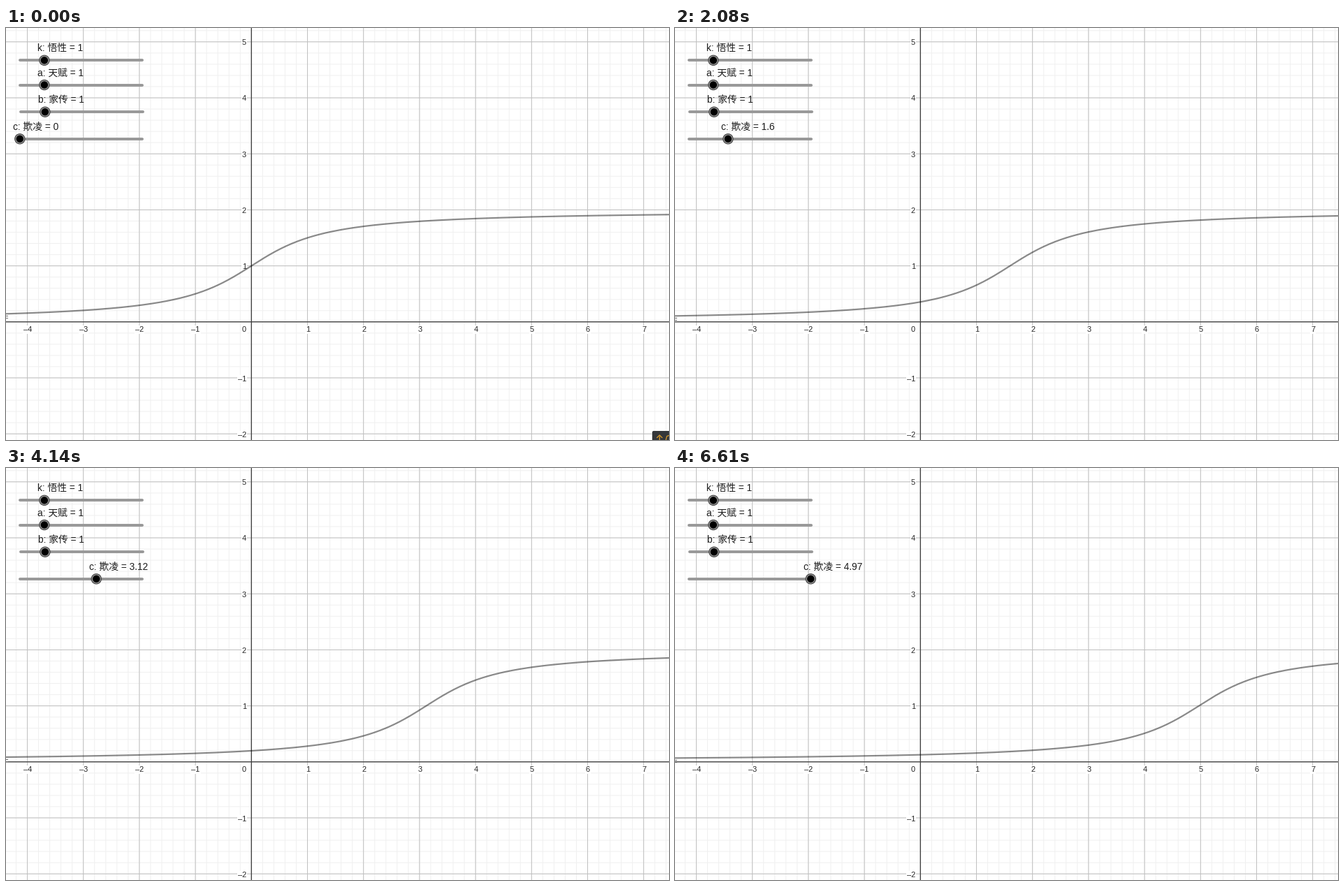
A matplotlib script for the animation above (6.7 s loop, 949 by 590 pixels).

```python
import numpy as np
import matplotlib.pyplot as plt
from matplotlib.animation import FuncAnimation
from matplotlib.collections import LineCollection
from matplotlib.patches import Circle, FancyBboxPatch

W, H, DPI = 949, 590, 128
PX = 72 / DPI                      # one pixel in points
X0, Y0, UNIT = 351.3, 420.8, 80.2  # origin and scale of the plot
LOOP, TICK, STEPS = 6700, 20, 86
SLIDER_X, SLIDER_UNIT, C_MAX = 19.8, 35.1, 5

fig = plt.figure(figsize=(W / DPI, H / DPI), dpi=DPI, facecolor="white")
ax = fig.add_axes([0, 0, 1, 1])
ax.set_xlim(0, W)
ax.set_ylim(H, 0)
ax.axis("off")


def col(n):
    return X0 + UNIT * n


def row(n):
    return Y0 - UNIT * n


def rules(xs, ys, color, width, z):
    segs = [[(x, 0), (x, H)] for x in xs] + [[(0, y), (W, y)] for y in ys]
    lines = LineCollection(segs, colors=color, linewidths=width * PX, zorder=z)
    lines.set_snap(False)
    ax.add_collection(lines)


def number(x, y, n):
    ax.text(x, y, str(n).replace("-", "\u2013"), va="baseline",
            family="Liberation Sans", size=11 * PX, color="#252525", zorder=4,
            bbox=dict(facecolor="white", edgecolor="none", pad=1 * PX))


def draw_grid():
    rules([col(i / 5) for i in range(-21, 38)],
          [row(i / 5) for i in range(-10, 27)], "#f0f0f0", 1, 1)
    rules([col(i) for i in range(-4, 8)],
          [row(i) for i in range(-2, 6)], "#c0c0c0", 1, 2)
    rules([col(0)], [row(0)], "#404040", 1.3, 5)
    for n in range(-4, 8):
        if n:
            number(col(n) - (2.7 if n > 0 else 5.7), 435, n)
    for n in range(-2, 6):
        if n:
            number(338 if n > 0 else 332, row(n) + 4.5, n)
    number(338, 435, 0)


class Slider:
    def __init__(self, name, y, value, shift=0):
        self.name, self.x = name, SLIDER_X + shift
        ax.plot([self.x, self.x + C_MAX * SLIDER_UNIT], [y, y], color="#999999",
                lw=4 * PX, solid_capstyle="round", zorder=8)
        self.knob = [
            Circle((0, y), 7.1, fc="#999999", ec="#484848", lw=1.2 * PX, zorder=9),
            Circle((0, y), 5.2, fc="black", ec="none", zorder=10)]
        for part in self.knob:
            ax.add_patch(part)
        self.label = ax.text(0, y - 13, "", size=13.8 * PX, color="#1c1c1c",
                             family=["Liberation Sans", "Noto Sans CJK JP"],
                             zorder=10)
        self.set(value)

    def set(self, value):
        x = self.x + SLIDER_UNIT * value
        for part in self.knob:
            part.center = (x, part.center[1])
        self.label.set_x(x - 10)
        shown = f"{value:.2f}".rstrip("0").rstrip(".")
        self.label.set_text(f"{self.name} = {shown}")


def draw_badge():
    box = FancyBboxPatch((927, 579), 40, 30, boxstyle="round,pad=2",
                         fc="#35373a", ec="none", zorder=12)
    ax.add_patch(box)
    strokes = LineCollection(
        [[(931.5, 587), (935.5, 583), (939.5, 587)], [(935.5, 583.5), (935.5, 590)],
         [(944.5, 590), (946, 584.5), (949, 583.5)]],
        colors="#d79a2b", linewidths=1.3 * PX, zorder=13)
    ax.add_collection(strokes)
    return [box, strokes]


draw_grid()
Slider("k: 悟性", 46.3, 1)
Slider("a: 天赋", 81.5, 1)
Slider("b: 家传", 120.2, 1, shift=1)
slider_c = Slider("c: 欺凌", 158.8, 0)
badge = draw_badge()

px = np.linspace(-4, W + 4, 480)
curve, = ax.plot(px, px, color="black", alpha=0.46, lw=2.2 * PX, zorder=6)
tag = [ax.plot([0, 2], [0, 0], color="#707070", lw=1 * PX, zorder=6)[0]
       for _ in range(2)]


def height(x, c):
    return row(1 + 2 / np.pi * np.arctan((x - X0) / UNIT - c))


def slider_value(t):
    """The slider gains 0.039 every 51.4 ms and turns back at its end."""
    c = 0.039 * ((t + 22) // 51.4)
    return round(C_MAX - abs(C_MAX - c), 2)


def update(i):
    # The picture refreshes in evenly spaced steps
    step = min(round(i * TICK * STEPS / LOOP), STEPS - 1)
    c = slider_value(step * LOOP / STEPS)
    slider_c.set(c)
    curve.set_ydata(height(px, c))
    for line, dy in zip(tag, (3, 6)):
        line.set_ydata([height(0, c) + dy] * 2)
    for part in badge:
        part.set_visible(step == 0)
    return [curve, *tag, *badge, *slider_c.knob, slider_c.label]


anim = FuncAnimation(fig, update, frames=LOOP // TICK, interval=TICK,
                     repeat=True, repeat_delay=0, blit=False)
plt.show()
```
